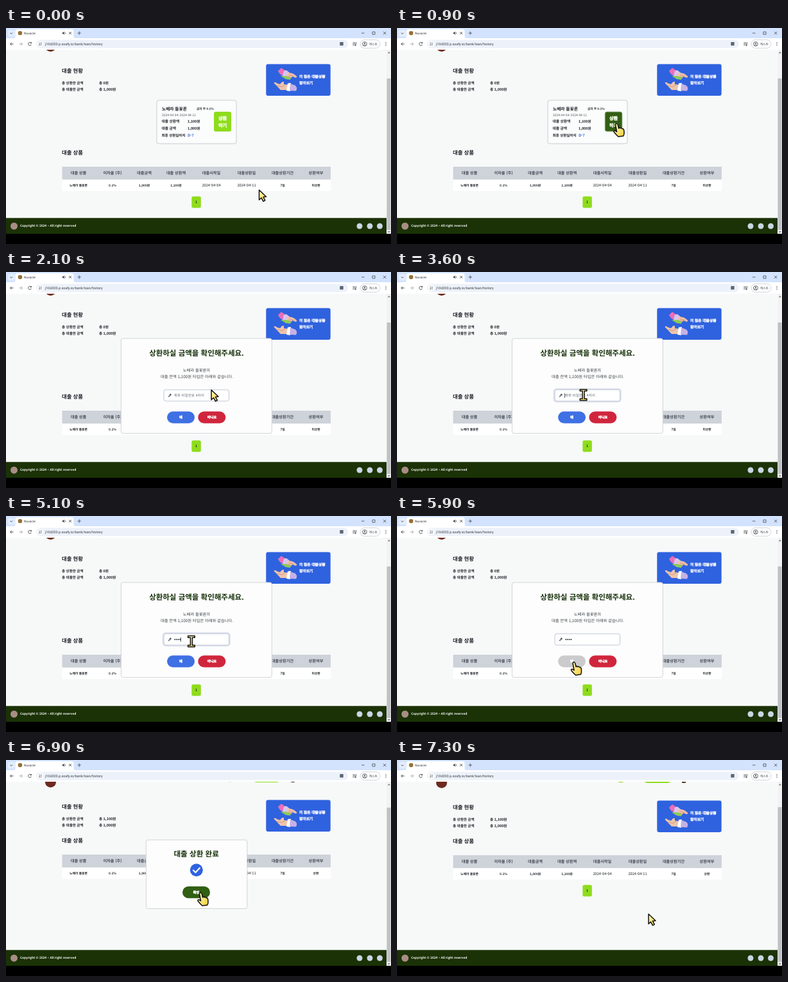
Write an HTML page that moves like this. It is 600 px wide and 338 px high and loops after 7400 ms.

```html
<!DOCTYPE html>
<html lang="ko">
<head>
<meta charset="utf-8">
<title>Loan repayment</title>
<style>
html, body { margin: 0; width: 100%; height: 100%; overflow: hidden; }
svg { display: block; width: 600px; height: 338px; background: #f7f9f9; }
text { font-family: "Noto Sans CJK KR", "Noto Sans CJK", sans-serif; font-weight: 700; text-rendering: geometricPrecision; white-space: pre; }
.ui { font-family: Roboto, "Noto Sans CJK KR", sans-serif; font-weight: 400; }
.thin { font-weight: 400; }
.mid { font-weight: 500; }
.glow { stroke: #fff; stroke-width: .5; }
</style>
</head>
<body>
<svg id="stage" viewBox="0 0 600 338"></svg>
<script>
const LOOP = 7400;
const PRODUCT = '노베라 들꽃론';
const LIME = '#8edc1c', INK = '#1c2026', FOREST = '#16300a', BLUE = '#2f62df';

// y is the vertical centre of the text
const text = (x, y, size, str, fill = INK, attrs = '') =>
  `<text x="${x}" y="${y + size * .36}" font-size="${size}" fill="${fill}" ${attrs}>${str}</text>`;
const centered = (x, y, size, str, fill, attrs = '') =>
  text(x, y, size, str, fill, `text-anchor="middle" ${attrs}`);
const rect = (x, y, w, h, r, fill, attrs = '') =>
  `<rect x="${x}" y="${y}" width="${w}" height="${h}" rx="${r}" fill="${fill}" ${attrs}/>`;
const circle = (x, y, r, fill, attrs = '') => `<circle cx="${x}" cy="${y}" r="${r}" fill="${fill}" ${attrs}/>`;
const line = (d, color, width = 1, attrs = '') =>
  `<path d="${d}" fill="none" stroke="${color}" stroke-width="${width}" ${attrs}/>`;
const shape = (d, fill) => `<path d="${d}" fill="${fill}"/>`;
const group = (id, ...parts) => `<g id="${id}">${parts.join('')}</g>`;

const panel = (x, y, w, h) => rect(x, y, w, h, 3, '#fdfdfd', 'stroke="#d0d3d6"');

const banner = [
  rect(405.3, 56.4, 100.4, 49.7, 3, BLUE),
  shape('M424 67 L429 62.5 L436 67 L432 75 Q426 73 424 67Z', '#e76fb8'),
  shape('M433 67 L437 66 L442 70 L438 77 L431 75Z', '#d9c4ee'),
  shape('M439 70 Q447 69 453.5 76 L452 78 L446 76 L444 79 L437 77Z', '#efc0a8'),
  shape('M428 75 L437 75 L444 77.5 L443 81 L436 80Z', '#8ccb58'),
  line('M441 73.5 L449 75.5 M440 76 L446 77.5', '#b9826f', .6),
  shape('M417.5 86 Q419 83.5 422 86.5 L427 88 L430 84.5 L433 84 L433 88 L440 89 L438 97 L428 97Z', '#f0c4ab'),
  line('M422 90 L430 92 L435 89', '#bd8a76', .7),
  shape('M439 86.5 L444 86 L443 99 L437 98Z', '#fff'),
  shape('M443 87 L451 90 Q455 94 452 98.5 L442 98Z', '#c6b1e6'),
  text(457, 76, 5.8, '더 많은 대출상품', BLUE, 'class="glow"'),
  text(457, 86, 5.8, '알아보기', BLUE, 'class="glow"')
].join('');

const columns = [[113, '대출 상품', PRODUCT], [166, '이자율 (주)', '0.1%'], [215.5, '대출금액', '1,000원'],
  [265, '대출 상환액', '1,100원'], [320, '대출시작일', '2024-04-04'], [375, '대출상환일', '2024-04-11'],
  [431, '대출상환기간', '7일'], [483, '상환여부', '미상환']];
const table = columns.map(([x, head, cell], i) =>
  centered(x, 227, 6.2, head, '#454b57') +
  (cell.startsWith('2024') ? centered(x, 245.8, 5.7, cell, INK, 'class="mid"')
    : centered(x, 245.8, 4.8, cell, INK, i == 7 ? 'id="status"' : ''))).join('');

const card = group('card',
  rect(235, 113, 124, 68, 3, '#fbfcfc', 'stroke="#c9ccd0"'),
  text(243, 126.5, 6.7, PRODUCT), text(297, 126.3, 4.6, '금리 주 0.1%'),
  text(243, 136.3, 4.9, '2024-04-04~2024-04-11', '#50555c', 'class="thin"'),
  text(242.5, 146, 5.7, '대출 상환액'), text(283, 146, 5.4, '1,100원'),
  text(242.5, 156.7, 5.7, '대출 금액'), text(283, 156.7, 5.4, '1,000원'),
  text(242.5, 168, 5.5, '최종 상환일까지'), text(283, 168, 5.8, 'D-7', '#3a69d8'),
  rect(324, 131, 27, 31, 3, LIME, 'id="repay"'),
  centered(337.5, 141.5, 7.1, '상환', '#d5f2a8', 'class="glow"'),
  centered(337.5, 152.5, 7.1, '하기', '#d5f2a8', 'class="glow"'));

const page = group('page',
  circle(69.5, 28.5, 8.5, '#6e2a20'),
  circle(349, 20.5, 8, '#a5d84a'), rect(385, 16, 42, 13, 5, LIME), rect(444, 20, 6, 9, 1, '#54392c'),
  text(87, 67.3, 8.3, '대출 현황'),
  text(87, 86.5, 5.5, '총 상환한 금액'), text(145, 86.5, 5.5, '총 0원', INK, 'id="repaid"'),
  text(87, 96, 5.5, '총 대출한 금액'), text(145, 96, 5.5, '총 1,000원'),
  banner, card,
  group('lower',
    text(87, 194.8, 8.3, '대출 상품'),
    rect(87.5, 217, 418.5, 20.3, 0, '#ced2d9'), rect(87.5, 237.3, 418.5, 17.7, 0, '#fff'),
    table,
    rect(289.3, 263.5, 14.5, 18, 2.5, LIME), centered(296.5, 272.3, 5, '1')));

const pill = (id, x, y, label, fill) =>
  rect(x, y, 43, 18.5, 9.25, fill, `id="${id}"`) +
  centered(x + 21.5, y + 9.2, 5.2, label, '#fff', 'class="glow"');

const confirmBox = group('confirm',
  panel(179.3, 104, 235, 148.5),
  centered(297, 126.5, 11.5, '상환하실 금액을 확인해주세요.', FOREST),
  centered(297, 154, 6.3, PRODUCT + '의', '#3b4046', 'class="thin"'),
  centered(297.5, 163.3, 6.3, '대출 잔액 1,100원 타입은 아래와 같습니다.', '#3b4046', 'class="thin"'),
  rect(245, 183.2, 103.5, 19.5, 4, 'none', 'id="ring" stroke="#dfe3ed" stroke-width="3"'),
  rect(246, 184.2, 101.5, 17.8, 3, '#fff', 'stroke="#c0c7d5"'),
  circle(256.2, 192, 1.5, '#555c66'), line('M255.4 192.8 L252.8 195.4 M254 194.2 l1 1', '#555c66', 1.1),
  text(261.5, 193.2, 5.6, '계좌 비밀번호 4자리', '#686e78', 'id="hint" class="mid"'),
  group('dots', ...[0, 1, 2, 3].map(i => circle(263.3 + i * 2.7, 193.2, .95, INK))),
  rect(261, 189.8, .8, 7, 0, '#222', 'id="caret"'),
  pill('yes', 251, 218.3, '네', '#3f70e4'), pill('no', 299.3, 218.3, '아니요', '#d0263d'));

const doneBox = group('done',
  panel(218.3, 125, 157.5, 107.5),
  centered(296.7, 146.8, 11.6, '대출 상환 완료', FOREST),
  circle(296.8, 172.2, 10, BLUE),
  line('M292 172.6 L295.4 176 L301.8 169', '#fff', 2.2, 'stroke-linecap="round" stroke-linejoin="round"'),
  pill('ok', 275, 197.8, '확인', '#93dd31'));

const footer = rect(0, 297.3, 593, 25, 0, '#1b3206') + rect(0, 322, 600, 16, 0, '#000') +
  circle(12.5, 310, 5.5, '#a98d85') +
  text(22, 309.6, 4.75, 'Copyright © 2024 ~ All right reserved', '#fff') +
  [551, 567, 582.5].map(x => circle(x, 310, 4.5, '#c9d6e2')).join('');

const scrollbar = rect(593, 34, 7, 288, 0, '#f3f3f3') + rect(593.5, 79, 6, 237, 0, '#bfc1c3', 'id="thumb"') +
  shape('M594.8 39.5 h4 l-2 -2.5z', '#777') + shape('M594.8 318 h4 l-2 2.5z', '#777');

const DARK = '#3f4348';
const browser = [
  rect(0, 0, 600, 17, 0, '#d3e3fd'),
  rect(3, 3, 10.5, 10.5, 3, '#e4edfd'), line('M6.5 7.5 l1.8 1.8 l1.8 -1.8', DARK, .9),
  shape('M12 16 Q14.5 16 14.5 13 V5 Q14.5 2 18 2 H102 Q105.5 2 105.5 5 V13 Q105.5 16 108 16Z', '#fff'),
  circle(22, 8, 3.3, '#96713a'),
  text(28, 8, 4.9, 'Nuvacre', '#30343a', 'class="ui"'),
  shape('M87.8 7 h1.2 l1.6 -1.5 v5 l-1.6 -1.5 h-1.2z', DARK), line('M91.8 6.3 q1.4 1.7 0 3.4', DARK, .7),
  line('M98 6 l4 4 m0 -4 l-4 4 M111.5 8 h5.4 M114.2 5.3 v5.4', DARK, .8),
  line('M554 8 h4.5 M571 6 h4 v4 h-4z M588 5.8 l4.4 4.4 m0 -4.4 l-4.4 4.4', DARK, .8),
  rect(0, 16, 600, 18, 0, '#fff'),
  line('M11.6 25 h-5 m2.3 -2.4 l-2.4 2.4 l2.4 2.4', DARK, .9),
  line('M20.5 25 h5 m-2.3 -2.4 l2.4 2.4 l-2.4 2.4', '#9da1a6', .9),
  line('M39.2 23.4 a2.5 2.5 0 1 0 .3 2.4 M39.5 22 v1.8 h-1.9', DARK, .9),
  rect(47, 18.5, 486, 13, 6.5, '#edf2fa'),
  circle(53.5, 25, 4.7, '#fff'),
  line('M51.2 23.7 h2.4 M53.4 26.4 h2.4', DARK, .8), circle(55, 23.7, .8, DARK), circle(52, 26.4, .8, DARK),
  text(61, 25, 5.45, 'j10d203.p.ssafy.io/bank/loan/history', '#35393e', 'class="ui"'),
  rect(520.3, 22, 5.4, 5.4, .6, '#5c6673'),
  line('M540.3 23 h4 M540.3 25 h4 M540.3 27 h2 M545.2 27 v-4 h1.3', DARK, .8), circle(544.4, 27, 1, DARK),
  rect(552, 18.5, 31, 13, 6.5, '#fff', 'stroke="#c4cad2" stroke-width=".8"'),
  circle(559, 25, 3.4, 'none', `stroke="${DARK}" stroke-width=".8"`), circle(559, 24, 1.1, DARK),
  line('M557 27 q2 -1.6 4 0', DARK, .8),
  text(565.5, 25, 4.9, '게스트', '#35393e', 'class="thin"'),
  [22.7, 25, 27.3].map(y => circle(592, y, .65, DARK)).join('')
].join('');

const pointerStyle = 'fill="url(#gold)" stroke="#111" stroke-width="1.5" stroke-linejoin="round"';
const pointers = `<defs><linearGradient id="gold" x2="1" y2="1">
  <stop offset=".2" stop-color="#fff3a8"/><stop offset="1" stop-color="#f5cc35"/></linearGradient></defs>` +
  group('pointer',
    `<path id="arrow" ${pointerStyle} d="M.5 .5 V16 L4 12.8 L7 18.3 L9.8 16.8 L7 11.5 L11.5 11Z"/>`,
    `<path id="hand" ${pointerStyle} d="M-1.5 1.5 Q-1.3 -.8 .8 -.4 Q2 0 2.5 2.5 L3.5 7
      Q5 5.2 6.3 7 Q8 5.8 9 7.8 Q11 7.2 11.5 9.5 Q12.8 15 10.8 19 L2.8 20 Q-1 16.5 -4 12.5
      Q-4.5 10 -2 10.7 L.5 12.5Z"/>`,
    `<path id="beam" ${pointerStyle} d="M-5.3 -8.6 H5.3 V-6 H1.5 V6 H5.3 V8.6 H-5.3 V6 H-1.5 V-6 H-5.3Z"/>`);

document.getElementById('stage').innerHTML =
  page + footer + scrollbar + browser + confirmBox + doneBox + pointers;

const $ = id => document.getElementById(id);
const show = (id, on) => $(id).setAttribute('visibility', on ? 'visible' : 'hidden');
const shift = (id, x, y) => $(id).setAttribute('transform', `translate(${x} ${y})`);
const inside = ([x, y], left, top, w, h) => x > left && x < left + w && y > top && y < top + h;

// time, x, y of the pointer's hot spot
const path = [[0, 394, 253], [500, 390, 252], [800, 374, 245], [900, 342, 150], [1600, 342, 150],
  [2100, 319.5, 184], [2250, 319.5, 184], [2700, 289, 192.3], [3300, 289, 192.3], [3600, 290.5, 192.3],
  [5000, 290.5, 192.3], [5500, 275.5, 229], [6250, 275.5, 229], [6600, 317, 212.3], [6750, 303, 208],
  [6950, 303, 208], [7300, 391.5, 240.5], [LOOP, 391.5, 240.5]];
const KEYS = [3800, 3900, 4100, 4700];
const OPEN = 1600, FOCUS = 2600, BLUR = 5700, PAID = 6200, CLOSE = 7000;

function pointerAt(t) {
  const i = path.findIndex(p => p[0] > t);
  const [t0, x0, y0] = path[i - 1], [t1, x1, y1] = path[i];
  const k = (t - t0) / (t1 - t0), e = k * k * (3 - 2 * k);
  return [x0 + (x1 - x0) * e, y0 + (y1 - y0) * e];
}

function draw(t) {
  const at = pointerAt(t);
  const paid = t >= PAID, asking = t >= OPEN && !paid, done = paid && t < CLOSE;
  const focused = t >= FOCUS && t < BLUR;
  const scroll = !paid ? 0 : done ? 6 : 7;

  shift('page', 0, scroll);
  shift('lower', 0, paid ? -75 : 0);
  $('thumb').setAttribute('y', 79 - scroll * .75);
  $('thumb').setAttribute('height', 237 + scroll * .75);
  $('repaid').textContent = paid ? '총 1,100원' : '총 0원';
  $('status').textContent = paid ? '상환' : '미상환';
  show('card', !paid);
  $('confirm').style.display = asking ? '' : 'none';
  $('done').style.display = done ? '' : 'none';

  const pressed = KEYS.filter(k => k <= t);
  const lastKey = pressed.length ? pressed[pressed.length - 1] : FOCUS;
  show('hint', !pressed.length);
  [...$('dots').children].forEach((dot, i) =>
    dot.setAttribute('visibility', i < pressed.length ? 'visible' : 'hidden'));
  show('ring', focused);
  show('caret', focused && Math.floor((t - lastKey) / 500) % 2 == 0);
  shift('caret', pressed.length * 2.7, 0);

  const onRepay = t < OPEN && inside(at, 324, 131, 27, 31);
  const onYes = asking && inside(at, 251, 218.3, 43, 18.5);
  const onOk = done && inside(at, 275, 197.8, 41, 18.5);
  const onInput = asking && inside(at, 246, 184.2, 102, 18);
  $('repay').setAttribute('fill', onRepay ? '#315f14' : LIME);
  $('repay').setAttribute('stroke', onRepay ? '#b5c9a6' : 'none');
  $('yes').setAttribute('fill', onYes ? '#cbcbcd' : '#3f70e4');
  $('ok').setAttribute('fill', onOk ? '#315f14' : '#93dd31');

  const onButton = onRepay || onYes || onOk;
  shift('pointer', ...at);
  show('hand', onButton);
  show('beam', onInput);
  show('arrow', !onButton && !onInput);
}

function tick(now) {
  draw(now % LOOP);
  requestAnimationFrame(tick);
}
draw(0);
requestAnimationFrame(tick);
</script>
</body>
</html>
```
